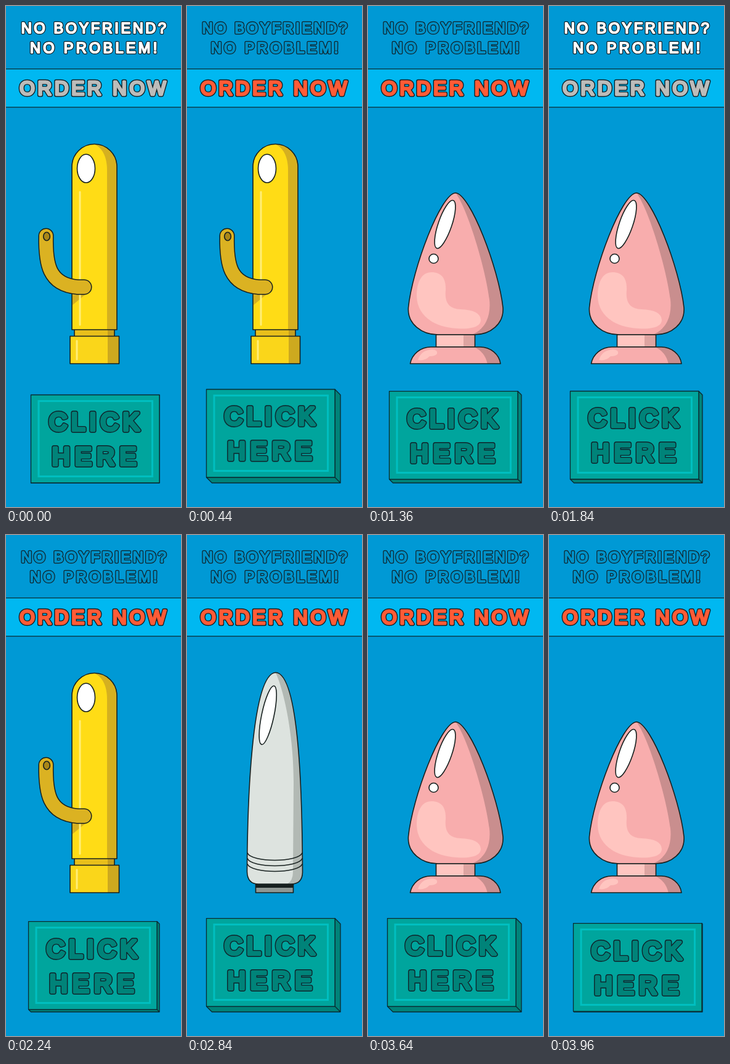
An HTML page for the animation above (4000 ms loop, 284 by 811 pixels).

```html
<!DOCTYPE html>
<html lang="en">
<head>
<meta charset="utf-8">
<title>Order now</title>
<style>
  html, body { margin: 0; width: 100%; height: 100%; overflow: hidden; background: #0099d5; }
  svg { display: block; width: 284px; height: 811px; }

  /* Thin letters thickened by round strokes give soft, rounded lettering. */
  text { font-family: "Liberation Sans", Arial, sans-serif; white-space: pre; }
  .ink, .tint { stroke-linejoin: round; stroke-linecap: round; }
  .ink { fill: #10242c; stroke: #10242c; stroke-width: var(--outer); }
  .tint { fill: currentColor; stroke: currentColor; stroke-width: var(--inner); }
  .small { --outer: 4.6px; --inner: 2.1px; }
  .medium { --outer: 6.4px; --inner: 3.6px; }
  .large { --outer: 8px; --inner: 5.2px; color: #008379; }

  .line { stroke: #17201f; stroke-width: 1.6px; stroke-linejoin: round; }
  .thin { stroke: #0b2a30; stroke-width: 1.3px; stroke-linejoin: round; }

  .headline { animation: headline .8s step-end infinite; }
  .order { animation: order .8s step-end infinite; }
  @keyframes headline { 0% { color: #fff; } 50%, 100% { color: #0091c8; } }
  @keyframes order { 0% { color: #bcbcba; } 50%, 100% { color: #ff5b36; } }

  .item { animation: turn 2s step-end infinite; }
  .second { animation-delay: -1.33333s; }
  .third { animation-delay: -.66667s; }
  @keyframes turn { 0% { visibility: visible; } 33.3333%, 100% { visibility: hidden; } }

  .face { animation: lift .4s linear infinite alternate; }
  .sides { animation: extrude .4s linear infinite alternate; }
  @keyframes lift { to { transform: translate(-10px, -10px); } }
  @keyframes extrude {
    from { d: path("M40.5 772 L40.5 772 L249 772 L249 629.5 L249 629.5 L249 772 Z M249 772 L249 772"); }
    to { d: path("M30.5 762 L40.5 772 L249 772 L249 629.5 L239 619.5 L239 762 Z M239 762 L249 772"); }
  }
</style>
</head>
<body>
<svg viewBox="0 0 284 811" xmlns="http://www.w3.org/2000/svg">
  <defs>
    <g id="headline" font-size="23.5">
      <text x="24.8" y="43.7" letter-spacing="3.6">NO BOYFRIEND?</text>
      <text x="39" y="75.7" letter-spacing="4.3">NO PROBLEM!</text>
    </g>
    <text id="order" x="22.2" y="144.1" font-size="31.4" letter-spacing="4.8">ORDER NOW</text>
    <g id="label" font-size="40">
      <text x="70" y="687.5" letter-spacing="7.1">CLICK</text>
      <text x="74.8" y="743.5" letter-spacing="8.4">HERE</text>
    </g>

    <path id="tube" d="M107 524 V260 A36.5 36.5 0 0 1 180 260 V524 Z"/>
    <path id="arm" d="M65 372 C64 417 69 451 116 455 H127" fill="none" stroke-linecap="round"/>
    <path id="shell" d="M144 222.5 C104 225 98 440 97.5 545 Q98 565 116 565 H169 Q187 565 187.500 546 C187 440 184 225 144 222.5 Z"/>
    <clipPath id="in-shell"><use href="#shell"/></clipPath>
    <path id="band" d="M98 514.500 C104 530.500 181 530.500 187 514.500" fill="none"/>
    <path id="drop" d="M142 302.5 C118 304 72 425 65.5 488 C63.5 515 88 532 113 532 H173 C198 532 221 515 219 488 C212 425 166 304 142 302.5 Z"/>
    <clipPath id="in-drop"><use href="#drop"/></clipPath>
    <path id="foot" d="M68.5 579 C71 564 85 552 102 552 H182 C199 552 213 564 215 579 Z"/>
    <clipPath id="in-foot"><use href="#foot"/></clipPath>
  </defs>

  <rect width="284" height="811" fill="#0099d5"/>
  <rect x="-2" y="101.8" width="288" height="62.1" fill="#00b8f1" class="thin"/>

  <g class="small">
    <use href="#headline" class="ink"/>
    <use href="#headline" class="tint headline"/>
  </g>
  <g class="medium">
    <use href="#order" class="ink"/>
    <use href="#order" class="tint order"/>
  </g>

  <!-- yellow -->
  <g class="item">
    <rect x="111" y="523" width="65" height="12" fill="#e8bf1b"/>
    <rect x="165" y="523" width="11" height="12" fill="#c49e1f"/>
    <rect x="111" y="523" width="65" height="12" fill="none" class="line"/>
    <use href="#tube" fill="#ffdc16"/>
    <path d="M143.5 223.5 Q164 234 164 266 V524 H180 V260 A36.5 36.5 0 0 0 143.5 223.5 Z" fill="#d5b020"/>
    <path d="M108 466 H130 L108 484 Z" fill="#d5b020"/>
    <path d="M120 301 V516" stroke="#ffee78" stroke-width="3" stroke-linecap="round"/>
    <use href="#tube" fill="none" class="line"/>
    <ellipse cx="130" cy="263" rx="14.5" ry="23" fill="#fff" class="line"/>
    <rect x="104" y="534.5" width="79.5" height="44.5" fill="#fad61a"/>
    <rect x="165" y="534.5" width="18.5" height="44.5" fill="#cda91f"/>
    <path d="M115 542 V572" stroke="#ffee78" stroke-width="3" stroke-linecap="round"/>
    <rect x="104" y="534.5" width="79.5" height="44.5" fill="none" class="line"/>
    <use href="#arm" stroke="#17201f" stroke-width="25"/>
    <use href="#arm" stroke="#dbb222" stroke-width="22"/>
    <ellipse cx="66" cy="373" rx="5.3" ry="6.8" fill="#a98718" class="line"/>
  </g>

  <!-- silver -->
  <g class="item second">
    <rect x="111.5" y="565" width="61" height="14" fill="#8f9793" class="line"/>
    <rect x="111" y="565" width="62" height="6" fill="#17201f"/>
    <use href="#shell" fill="#dde3df"/>
    <path d="M142 220 C152 235 173 310 173 400 L172 545 Q172 562 160 566 H200 V220 Z" fill="#b2b9b4" clip-path="url(#in-shell)"/>
    <use href="#shell" fill="none" class="line"/>
    <ellipse cx="131.2" cy="291.7" rx="10" ry="48.5" transform="rotate(12 131.2 291.7)" fill="#fff" class="line"/>
    <g class="line">
      <use href="#band"/>
      <use href="#band" y="9"/>
      <use href="#band" y="18"/>
    </g>
  </g>

  <!-- pink -->
  <g class="item third">
    <rect x="110.5" y="532" width="63" height="20" fill="#ffc6c1"/>
    <rect x="155" y="532" width="18.5" height="20" fill="#dda4a1"/>
    <rect x="110.5" y="532" width="63" height="20" fill="none" class="line"/>
    <use href="#foot" fill="#f8adad"/>
    <path d="M172 552 Q190 560 194 580 H220 V550 Z" fill="#c98e8e" clip-path="url(#in-foot)"/>
    <path d="M81 573 Q86 557 104 556 Q114 557 112 563 Q109 567 100 567 Q92 575 81 573 Z" fill="#ffc5c0"/>
    <use href="#foot" fill="none" class="line"/>
    <use href="#drop" fill="#f8adad"/>
    <path d="M140 300 C160 322 191 425 197 475 C200 502 190 525 166 533 H225 V300 Z" fill="#c98e8e" clip-path="url(#in-drop)"/>
    <path d="M103 431 C120 431 127 442 126 460 C124 482 133 490 150 491 Q182 492 183 508 C183 522 160 523 145 522 C105 520 80 500 79 470 C79 445 88 431 103 431 Z" fill="#ffc5c0"/>
    <use href="#drop" fill="none" class="line"/>
    <ellipse cx="125" cy="353.5" rx="11" ry="41" transform="rotate(19 125 353.5)" fill="#fff" class="line"/>
    <circle cx="106.5" cy="409" r="7.5" fill="#fff" class="line"/>
  </g>

  <!-- button -->
  <path class="sides thin" fill="#008379"/>
  <g class="face large">
    <rect x="40.5" y="629.5" width="208.5" height="142.5" fill="#00a59d" class="thin"/>
    <rect x="53" y="639.5" width="184.5" height="122" fill="none" stroke="#00bfc0" stroke-width="3"/>
    <use href="#label" class="ink"/>
    <use href="#label" class="tint"/>
  </g>
</svg>
</body>
</html>
```
